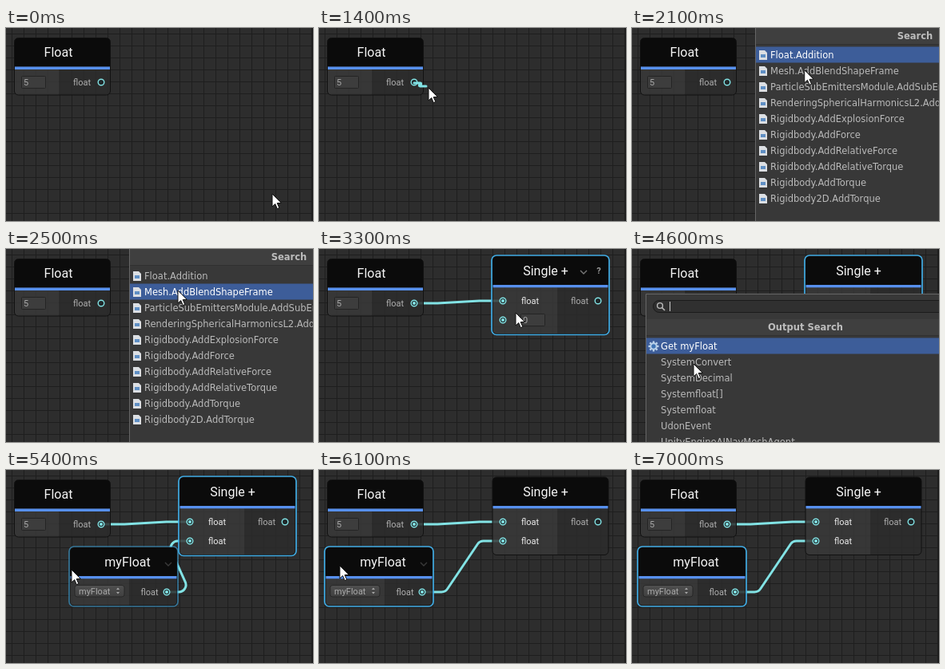
Recreate the animation shown at these times as an HTML page with a canvas. Size 384x242 px, loop 7.2 s.

```html
<!DOCTYPE html>
<html lang="en">
<head>
<meta charset="utf-8">
<title>Node graph</title>
<style>
  html, body { margin: 0; width: 100%; height: 100%; overflow: hidden; background: #2d2d2d; }
  canvas { display: block; }
</style>
</head>
<body>
<canvas id="stage" width="384" height="242"></canvas>
<script>
const ctx = document.getElementById('stage').getContext('2d');
const LOOP = 7200, STEP = 100;
const CYAN = '#82e3e5', BLUE = '#5790ee', SELECT = '#40abe3';
const NODE_FONT = 'Roboto, sans-serif';
const MENU_FONT = '11.5px "DejaVu Sans", sans-serif';

// Keys are [time, x, y]
const CURSOR = [
  [0, 333, 208], [800, 122, 30], [900, 128, 52], [1100, 121, 68], [1300, 121, 68],
  [1400, 137, 75], [1900, 216, 53], [2500, 215, 52], [2800, 214, 34], [2950, 214, 34],
  [3300, 246, 80], [3700, 230, 89], [3800, 228, 90], [4300, 40, 142], [4500, 76, 144],
  [4700, 78, 144], [5000, 82, 124], [5400, 82, 125], [5600, 98, 120], [6100, 26, 120],
  [6400, 26, 122], [6900, -14, 212]
];
const NODE_DRAG = [[5600, 80, 97], [6100, 8, 97]];

const ADD_ROWS = ['Float.Addition', 'Mesh.AddBlendShapeFrame',
  'ParticleSubEmittersModule.AddSubEmitter', 'RenderingSphericalHarmonicsL2.AddAmbientLight',
  'Rigidbody.AddExplosionForce', 'Rigidbody.AddForce', 'Rigidbody.AddRelativeForce',
  'Rigidbody.AddRelativeTorque', 'Rigidbody.AddTorque', 'Rigidbody2D.AddTorque'];
const OUTPUT_ROWS = ['Get myFloat', 'SystemConvert', 'SystemDecimal', 'Systemfloat[]',
  'Systemfloat', 'UdonEvent', 'UnityEngineAINavMeshAgent'];

const within = (t, from, to) => t >= from && t < to;

function track(keys, t) {
  const next = keys.findIndex(k => k[0] > t);
  if (next === 0) return keys[0].slice(1);
  if (next < 0) return keys[keys.length - 1].slice(1);
  const [t0, x0, y0] = keys[next - 1], [t1, x1, y1] = keys[next];
  let u = (t - t0) / (t1 - t0);
  u = u * u * (3 - 2 * u);
  return [x0 + (x1 - x0) * u, y0 + (y1 - y0) * u];
}

function rect(x, y, w, h, fill) {
  ctx.fillStyle = fill;
  ctx.fillRect(x, y, w, h);
}

function round(x, y, w, h, r, fill, stroke, width = 1) {
  ctx.beginPath();
  ctx.roundRect(x, y, w, h, r);
  if (fill) { ctx.fillStyle = fill; ctx.fill(); }
  if (stroke) { ctx.strokeStyle = stroke; ctx.lineWidth = width; ctx.stroke(); }
}

function text(str, x, y, font, color, align = 'left') {
  ctx.font = font;
  ctx.fillStyle = color;
  ctx.textAlign = align;
  ctx.fillText(str, x, y);
}

function line(points, color, width) {
  ctx.beginPath();
  points.forEach(([x, y]) => ctx.lineTo(x, y));
  ctx.strokeStyle = color;
  ctx.lineWidth = width;
  ctx.stroke();
}

function circle(x, y, r, fill, stroke, width = 1.4) {
  ctx.beginPath();
  ctx.arc(x, y, r, 0, Math.PI * 2);
  if (fill) { ctx.fillStyle = fill; ctx.fill(); }
  if (stroke) { ctx.strokeStyle = stroke; ctx.lineWidth = width; ctx.stroke(); }
}

function grid() {
  rect(0, 0, 384, 242, '#2d2d2d');
  for (let p = 7; p < 384; p += 15) {
    rect(p, 0, 1, 242, '#1e1e1e');
    rect(0, p, 384, 1, '#1e1e1e');
  }
  rect(383, 0, 1, 242, '#1a1a1a');
}

// Leaves one port horizontally, enters the other horizontally, rounded in between
function wire(x0, y0, x1, y1) {
  const off = Math.min(29, Math.hypot(x1 - x0, y1 - y0));
  const a = x0 + off, b = x1 - off;
  const turn = Math.atan2(Math.abs(y1 - y0), b - a);
  const r = Math.min(9, off / 2 / Math.tan(turn / 2));
  ctx.beginPath();
  ctx.moveTo(x0, y0);
  ctx.arcTo(a, y0, b, y1, r);
  ctx.arcTo(b, y1, x1, y1, r);
  ctx.lineTo(x1, y1);
  ctx.lineCap = ctx.lineJoin = 'round';
  ctx.strokeStyle = CYAN;
  ctx.lineWidth = 3;
  ctx.stroke();
  ctx.lineCap = 'butt';
  ctx.lineJoin = 'miter';
}

function port(x, y, connected) {
  circle(x, y, 3.8, '#20282a', CYAN);
  if (connected) circle(x, y, 2, CYAN);
}

const label = (x, y, color = '#b0b0b0') => text('float', x, y, '11px ' + NODE_FONT, color);

function field(x, y, value) {
  round(x + .5, y + .5, 30, 15, 1, '#3d3d3d', '#242424');
  text(value, x + 3, y + 12, '11px ' + NODE_FONT, '#aaa');
}

function node(x, y, w, h, split, title, titleX, select = 0) {
  ctx.save();
  ctx.beginPath();
  ctx.roundRect(x, y, w, h, 5);
  ctx.clip();
  rect(x, y, w, 36, '#0b0b0b');
  rect(x, y + 36, w, 3.5, BLUE);
  rect(x, y + 39.5, split, h, 'rgba(57,57,57,.85)');
  rect(x + split, y + 39.5, w, h, 'rgba(44,44,44,.85)');
  ctx.restore();
  round(x, y, w, h, 5, null, '#111');
  if (select) {
    ctx.globalAlpha = select;
    round(x - 1, y - 1, w + 2, h + 2, 6, null, SELECT, 1.7);
    ctx.globalAlpha = 1;
  }
  text(title, x + titleX, Math.round(y + 23.7), '16px ' + NODE_FONT, '#f4f4f4', 'center');
}

const chevron = (x, y, color) => line([[x - 4, y - 2], [x, y + 2], [x + 4, y - 2]], color, 1.4);

function floatNode(connected) {
  node(10.5, 12.5, 120, 71.5, 56, 'Float', 55);
  field(19, 60, '5');
  label(84, 72);
  port(119, 68, connected);
}

function sumNode(t) {
  const second = t >= 5200;
  node(217, 9, 145, 97.5, 81, 'Single +', 66.5, within(t, 3000, 5600) ? 1 : 0);
  label(253, 69, '#eee');
  if (second) label(253, 93, '#eee');
  else field(252, 81, '0');
  label(315, 69);
  port(230, 65, true);
  port(230, 89, t >= 3300);
  port(349, 65, false);
  if (within(t, 3100, 3900)) {
    chevron(331, 29, '#777');
    text('?', 350, 31, 'bold 11px ' + NODE_FONT, '#999', 'center');
  }
}

function variableNode(t, x, y) {
  node(x, y, 134, 73, 74, 'myFloat', 72, t < 5600 ? .6 : 1);
  const box = ctx.createLinearGradient(0, y + 47, 0, y + 62);
  box.addColorStop(0, '#505050');
  box.addColorStop(1, '#404040');
  round(x + 6, y + 47.5, 62, 14.5, 3, box, '#272727');
  text('myFloat', x + 11, y + 58.5, '11px ' + NODE_FONT, '#aaa');
  ctx.fillStyle = '#aaa';
  for (const s of [-1, 1]) {
    ctx.beginPath();
    ctx.moveTo(x + 58, y + 54.5 + s * 1.5);
    ctx.lineTo(x + 62, y + 54.5 + s * 1.5);
    ctx.lineTo(x + 60, y + 54.5 + s * 4);
    ctx.fill();
  }
  label(x + 88.5, y + 60);
  port(x + 121, y + 56, true);
  if (t < 6400) chevron(x + 123, y + 21, '#3a3a3a');
}

function fileIcon(x, y) {
  ctx.beginPath();
  [[-5, -6], [2, -6], [5, -3], [5, 6], [-5, 6]].forEach(([dx, dy]) => ctx.lineTo(x + dx, y + dy));
  ctx.fillStyle = '#dcdfe3';
  ctx.fill();
  rect(x - 3, y - 1, 6, 4, '#5f8fc4');
}

function gearIcon(x, y) {
  for (let i = 0; i < 8; i++) {
    const a = i * Math.PI / 4;
    line([[x, y], [x + 6.5 * Math.cos(a), y + 6.5 * Math.sin(a)]], '#bcd3ea', 2.4);
  }
  circle(x, y, 3.7, '#3f74b5', '#b9d0e8', 2);
}

function menu(x, y, title, rows, selected, icon, textX) {
  rect(x, y, 400, 330, '#383838');
  line([[x + .5, 400], [x + .5, y + .5], [x + 400, y + .5]], '#666', 1);
  round(x + 9.5, y + 8.5, 380, 15, 7.5, '#303030', '#1b1b1b');
  circle(x + 18, y + 15, 3.4, null, '#bbb');
  line([[x + 20.5, y + 17.5], [x + 24, y + 21]], '#bbb', 1.6);
  rect(x + 30, y + 10, 1, 12, '#ccc');
  rect(x + 1, y + 32, 399, 20, '#3f3f3f');
  rect(x + 1, y + 52, 399, 1, '#303030');
  text(title, x + 200, y + 46, 'bold ' + MENU_FONT, '#bdbdbd', 'center');
  rows.forEach((row, i) => {
    const mid = y + 66 + i * 20;
    if (i === selected) rect(x + 1, mid - 10.5, 399, 20, '#3d5d99');
    icon(x + 10, mid, i);
    text(row, textX, mid + 4, MENU_FONT, i === selected ? '#fff' : '#bababa');
  });
}

function cursor(x, y) {
  const shape = [[0, 0], [0, 16], [3.7, 12.6], [6.3, 18.6], [8.8, 17.5], [6.2, 11.6], [11.3, 11.4]];
  ctx.beginPath();
  shape.forEach(([dx, dy]) => ctx.lineTo(x + dx, y + dy));
  ctx.closePath();
  ctx.fillStyle = '#fff';
  ctx.fill();
  ctx.strokeStyle = '#111';
  ctx.lineWidth = 1;
  ctx.stroke();
}

function draw(t) {
  const [mx, my] = track(CURSOR, t);
  const [vx, vy] = track(NODE_DRAG, t);
  const hasSum = t >= 3000, hasVariable = t >= 5200;

  grid();
  if (hasSum) wire(119, 68, 230, 65);
  if (hasVariable) wire(vx + 121, vy + 56, 230, 89);
  floatNode(hasSum);
  if (hasSum) sumNode(t);
  if (hasVariable) variableNode(t, vx, vy);

  if (within(t, 1400, 2000)) wire(119, 69, mx - 3, my - 2);
  if (within(t, 3800, 4600)) wire(mx, my, 230, 89);

  if (within(t, 2000, 3000)) {
    const selected = within(t, 2400, 2700) ? 1 : 0;
    menu(154, -32, 'Search', ADD_ROWS, selected, fileIcon, 173);
  }
  if (within(t, 4600, 5200)) {
    menu(17, 56, 'Output Search', OUTPUT_ROWS, 0, (x, y, i) => i || gearIcon(x, y), 36);
  }
  if (t < 6900) cursor(mx, my);
}

const start = performance.now();
function frame() {
  const t = (performance.now() - start) % LOOP;
  draw(Math.floor(t / STEP) * STEP);
  requestAnimationFrame(frame);
}
frame();
</script>
</body>
</html>
```
